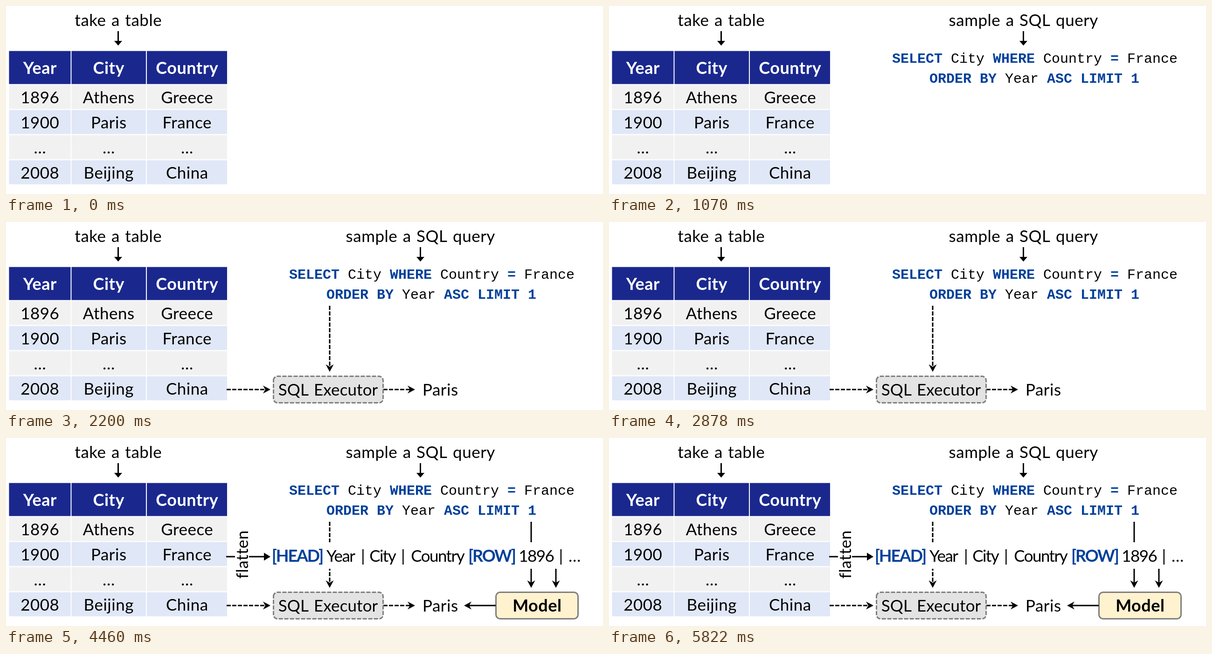
Animation, 1280 px wide and 404 px high, one loop 6.73 s. Source, as an HTML page with a canvas:

```html
<!DOCTYPE html>
<html lang="en">
<head>
<meta charset="utf-8">
<title>Table and SQL query</title>
<style>
html, body { margin: 0; width: 100%; height: 100%; overflow: hidden; background: #fff; }
canvas { display: block; }
</style>
</head>
<body>
<canvas id="stage" width="1280" height="404"></canvas>
<script>
const ctx = document.getElementById('stage').getContext('2d');
const LOOP = 6730;
const STEPS = [1070, 2200, 3330, 4460];
const REGULAR = '35px Lato, sans-serif';
const BOLD = 'bold 36px Lato, sans-serif';
const MONO = '30px "Liberation Mono", monospace';
const BLUE = '#00409a';
const DASH = [9, 3];

function box(x, y, w, h, color) {
  ctx.fillStyle = color;
  ctx.fillRect(x, y, w, h);
}

// Text centred on x
function label(str, x, y, { color = '#000', bold = false, gap = 0.5 } = {}) {
  ctx.font = bold ? BOLD : REGULAR;
  ctx.letterSpacing = gap + 'px';
  ctx.wordSpacing = '2px';
  ctx.textAlign = 'center';
  ctx.fillStyle = color;
  ctx.fillText(str, x + gap / 2, y);
}

// Words marked with * are keywords
function query(str, x, y) {
  ctx.letterSpacing = '0px';
  ctx.wordSpacing = '0px';
  ctx.textAlign = 'left';
  for (const word of str.split(' ')) {
    const key = word[0] === '*';
    const text = key ? word.slice(1) : word;
    ctx.font = (key ? 'bold ' : '') + MONO;
    ctx.fillStyle = key ? BLUE : '#000';
    ctx.fillText(text, x, y);
    x += (text.length + 1) * 18;
  }
}

function arrow(x1, y1, x2, y2, { dash = [], len = 16, notch = 5, half = 8.5 } = {}) {
  const size = Math.hypot(x2 - x1, y2 - y1);
  ctx.save();
  ctx.translate(x1, y1);
  ctx.rotate(Math.atan2(y2 - y1, x2 - x1));
  ctx.strokeStyle = ctx.fillStyle = '#000';
  ctx.lineWidth = 3;
  ctx.setLineDash(dash);
  ctx.beginPath();
  ctx.moveTo(0, 0);
  ctx.lineTo(size - len + notch, 0);
  ctx.stroke();
  ctx.beginPath();
  ctx.moveTo(size, 0);
  ctx.lineTo(size - len, -half);
  ctx.lineTo(size - len + notch, 0);
  ctx.lineTo(size - len, half);
  ctx.fill();
  ctx.restore();
}

// Rounded box, outlined clockwise from its left side
function panel(x, y, w, h, fill, dash) {
  const r = 9, right = x + w, bottom = y + h;
  ctx.save();
  ctx.beginPath();
  ctx.moveTo(x, y + r);
  ctx.arcTo(x, y, right, y, r);
  ctx.arcTo(right, y, right, bottom, r);
  ctx.arcTo(right, bottom, x, bottom, r);
  ctx.arcTo(x, bottom, x, y, r);
  ctx.closePath();
  ctx.fillStyle = fill;
  ctx.fill();
  ctx.strokeStyle = '#7f7f7f';
  ctx.lineWidth = 3;
  ctx.setLineDash(dash);
  ctx.stroke();
  ctx.restore();
}

function caption(str, x) {
  label(str, x, 43);
  arrow(x, 54, x, 85, { len: 10, notch: 0 });
}

function table() {
  const cols = [[6.5, 132, 72.5], [140.5, 159.5, 220], [302, 172, 388]];
  const rows = [
    ['Year', 'City', 'Country'],
    ['1896', 'Athens', 'Greece'],
    ['1900', 'Paris', 'France'],
    ['…', '…', '…'],
    ['2008', 'Beijing', 'China']
  ];
  rows.forEach((row, r) => row.forEach((text, c) => {
    const [x, w, mid] = cols[c];
    if (r === 0) {
      box(x, 96.7, w, 71, '#1a288e');
      label(text, mid, 146, { color: '#fff', bold: true });
    } else {
      box(x, 115.5 + r * 54, w, 51.7, r % 2 ? '#f1f1f1' : '#e0e7f7');
      label(text, mid, 155 + r * 54);
    }
  }));
}

function sampling() {
  caption('sample a SQL query', 888.5);
  query('*SELECT City *WHERE Country *= France', 607, 122);
  query('*ORDER *BY Year *ASC *LIMIT *1', 687, 165);
}

function execution() {
  arrow(694, 180, 694, 322, { dash: DASH });
  arrow(473, 360, 567, 360, { dash: DASH });
  arrow(809, 360, 877, 360, { dash: DASH });
  panel(573.5, 331.5, 235, 57, '#e3e3e3', DASH);
  label('SQL Executor', 690.5, 373, { gap: 0.1 });
  label('Paris', 931, 373);
}

function flattening() {
  arrow(1126, 180, 1126, 322);
  arrow(1179, 280, 1179, 322);
  box(570, 224, 664, 57, '#fff');

  arrow(472, 255, 567, 255, { len: 14, notch: 0 });
  box(491, 198, 30, 106, '#fff');
  ctx.save();
  ctx.translate(519, 250.5);
  ctx.rotate(-Math.PI / 2);
  label('flatten', 0, 0);
  ctx.restore();

  const tag = { color: BLUE, bold: true, gap: -2.2 };
  const tight = { gap: -1.6 };
  label('[HEAD]', 625.5, 266, tag);
  label('[ROW]', 1042.5, 266, tag);
  label('Year', 718, 266, tight);
  label('City', 808, 266, tight);
  label('Country', 926, 266, tight);
  label('1896', 1137.5, 266, tight);
  label('…', 1219, 266, tight);
  for (const x of [765.5, 851.5, 1190]) label('|', x, 266, tight);

  panel(1050.5, 331.5, 176, 57, '#fff2cf', []);
  label('Model', 1138.5, 373, { bold: true });
}

function answer() {
  arrow(1050, 360, 982, 360);
}

const scenes = [sampling, execution, flattening, answer];

function draw(now) {
  const t = now % LOOP;
  box(0, 0, 1280, 404, '#fff');
  caption('take a table', 240.5);
  table();
  scenes.forEach((scene, i) => { if (t >= STEPS[i]) scene(); });
}

const start = performance.now();
function tick() {
  draw(performance.now() - start);
  requestAnimationFrame(tick);
}
tick();
</script>
</body>
</html>
```
